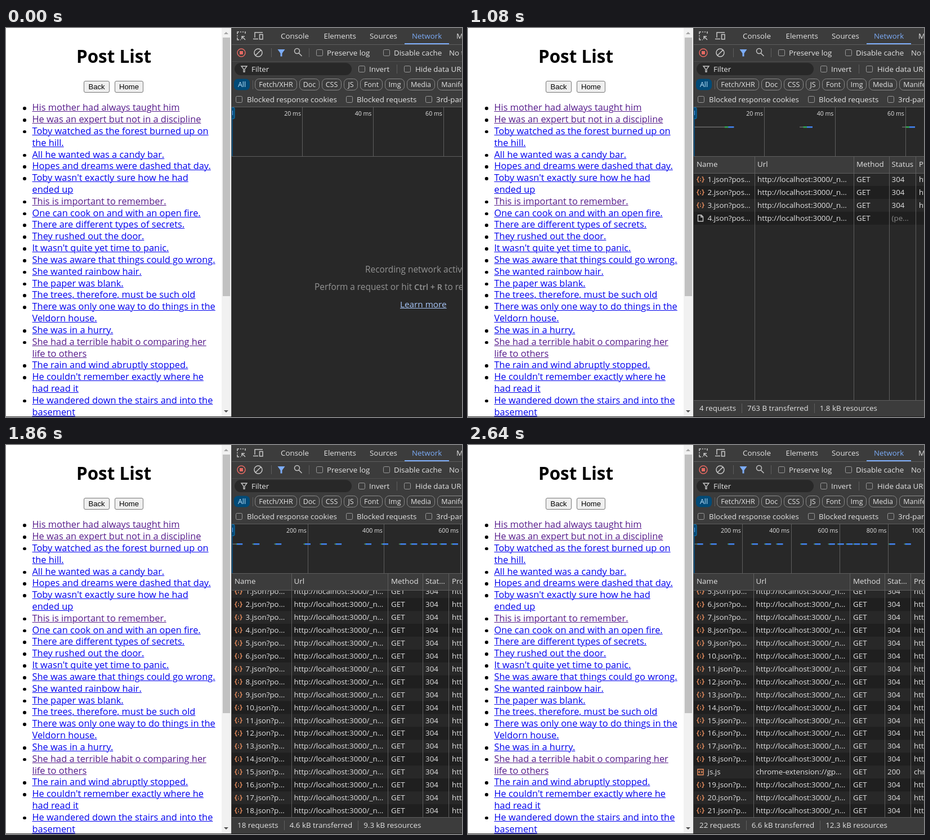
These frames come from a looping animation (810x692 px, 3300 ms). An HTML page with a canvas:

```html
<!DOCTYPE html>
<html lang="en">
<head>
<meta charset="utf-8">
<title>Post List</title>
<style>
html, body { margin: 0; width: 100%; height: 100%; overflow: hidden; background: #fff; }
body { position: relative; font: 16.4px/20.83px "Open Sans", "Noto Sans", sans-serif; color: #000; }
h1, ul, canvas, .button, .scrollbar, .scrollbar i, .edge { position: absolute; margin: 0; box-sizing: border-box; }
h1 { left: 0; top: 30px; width: 383px; font-size: 31.4px; line-height: 40px; text-align: center; }
ul { left: 46.5px; top: 131.2px; padding: 0; list-style: none; white-space: nowrap; }
li { position: relative; }
li::before { content: ""; position: absolute; left: -16.4px; top: 9px; width: 5.6px; height: 5.6px; border-radius: 50%; background: #000; }
li span { color: #00e; text-decoration: underline; text-decoration-thickness: 1px; }
li .visited { color: #551a8b; }
.button { top: 94px; height: 21px; border: 1px solid #767676; border-radius: 3px; background: #efefef;
  font: 13.1px/19px "Liberation Sans", Arial, sans-serif; text-align: center; }
.button.hover { background: #e0e0e0; border-color: #4f4f4f; }
.scrollbar { left: 383px; top: 0; width: 17px; height: 691px; background: #f1f1f1; }
.scrollbar i { left: 2px; top: 17px; width: 13px; height: 460px; background: #c1c1c1; }
.scrollbar .up, .scrollbar .down { left: 4px; width: 0; height: 0; background: none; border: 4px solid transparent; }
.scrollbar .up { top: 3px; border-bottom-color: #a3a3a3; }
.scrollbar .down { top: 680px; border-top-color: #505050; }
.edge { left: 0; top: 691px; width: 400px; height: 1px; background: #333; }
canvas { left: 400px; top: 0; }
</style>
</head>
<body>
<h1>Post List</h1>
<div class="button" style="left:138px;width:46px">Back</div>
<div class="button" id="home" style="left:193px;width:51px">Home</div>
<ul></ul>
<div class="scrollbar"><i></i><i class="up"></i><i class="down"></i></div>
<div class="edge"></div>
<canvas width="410" height="692"></canvas>
<script>
// A leading * marks a visited link, | a line break.
const posts = `*His mother had always taught him
*He was an expert but not in a discipline
Toby watched as the forest burned up on|the hill.
All he wanted was a candy bar.
Hopes and dreams were dashed that day.
Toby wasn't exactly sure how he had|ended up
*This is important to remember.
One can cook on and with an open fire.
There are different types of secrets.
They rushed out the door.
It wasn't quite yet time to panic.
She was aware that things could go wrong.
She wanted rainbow hair.
The paper was blank.
The trees, therefore, must be such old
There was only one way to do things in the|Veldorn house.
She was in a hurry.
*She had a terrible habit o comparing her|life to others
The rain and wind abruptly stopped.
He couldn't remember exactly where he|had read it
He wandered down the stairs and into the|basement`.split("\n");

document.querySelector("ul").innerHTML = posts.map(post =>
  `<li><span class="${post[0] === "*" ? "visited" : ""}">${post.replace("*", "").replace("|", "<br>")}</span></li>`).join("");

const home = document.getElementById("home");
const ctx = document.querySelector("canvas").getContext("2d");
ctx.translate(-400, 0);

const LOOP = 3300, STEP = 60;
const LEFT = 401, RIGHT = 810, TABLE_TOP = 259, TABLE_BOTTOM = 662, ROW = 22.93;
const BAR = "#3c3c3c", BODY = "#282828", LINE = "#5e5e5e", TEXT = "#e3e3e3", ICON = "#c7c7c7", BLUE = "#7cacf8", ORANGE = "#ee9160";

// When each row enters the table (loop time), and where its bar lies on the overview (ms).
const starts = [900, 960, 1020, 1080, 1140, 1200, 1320, 1380, 1440, 1470, 1500,
  1530, 1560, 1560, 1560, 1680, 1740, 1800, 1920, 1980, 2040, 2100];
const bars = [24, 80, 153, 250, 304, 353, 452, 508, 567, 604, 640, 670, 702, 740, 815, 880];
const SCRIPT_ROW = 18;

// Visible span in ms of the overview grid and of its bars, by loop time.
const gridSpan = [[1080, 65.2], [1620, 485], [1860, 605], [2160, 948]];
const barSpan = [[900, 65], [1080, 164], [1620, 485], [1860, 765], [2160, 948]];

function lerpPoints(points, t) {
  const next = points.findIndex(p => p[0] >= t);
  if (next === 0) return points[0][1];
  if (next < 0) return points[points.length - 1][1];
  const [t0, a] = points[next - 1], [t1, b] = points[next];
  return a + (b - a) * (t - t0) / (t1 - t0);
}

function rect(x, y, w, h, color) {
  ctx.fillStyle = color;
  ctx.fillRect(x, y, w, h);
}

function text(string, x, y, { color = TEXT, size = 13.35, weight = 400, align = "left" } = {}) {
  ctx.font = `${weight} ${size}px "Open Sans", "Noto Sans", sans-serif`;
  ctx.fillStyle = color;
  ctx.textAlign = align;
  ctx.fillText(string, x, y);
  return ctx.measureText(string).width;
}

function box(x, y, w, h, radius, { stroke, fill }) {
  ctx.beginPath();
  ctx.roundRect(x, y, w, h, radius);
  if (fill) { ctx.fillStyle = fill; ctx.fill(); }
  if (stroke) { ctx.strokeStyle = stroke; ctx.lineWidth = 1; ctx.stroke(); }
}

function icon(x, y, path, color, { width = 1.5, fill = false } = {}) {
  ctx.save();
  ctx.translate(x, y);
  ctx.strokeStyle = ctx.fillStyle = color;
  ctx.lineWidth = width;
  fill ? ctx.fill(new Path2D(path)) : ctx.stroke(new Path2D(path));
  ctx.restore();
}

const shapes = {
  inspect: "M-7-3V-7H-4M-2-7H0M2-7H4M6-7H7V-4M-7-1V1M-7 3V7H-4M-2 7H-1M7 7L1 1M1 6V1H6",
  device: "M-6 3V-6H8M-9 5.5H0M2.5-2.5H8V6H2.5Z",
  ring: "M7 0A7 7 0 1 1-7 0A7 7 0 1 1 7 0",
  slash: "M-5 5L5-5",
  funnel: "M-5-5H5L1 0V5H-1V0Z",
  search: "M3-2A4.5 4.5 0 1 1-6-2A4.5 4.5 0 1 1 3-2M2 2L7 7",
  json: "M-2.5-4.5H-3.5Q-4.5-4.5-4.5-3.5V-1.5L-6 0L-4.5 1.5V3.5Q-4.5 4.5-3.5 4.5H-2.5M2.5-4.5H3.5Q4.5-4.5 4.5-3.5V-1.5L6 0L4.5 1.5V3.5Q4.5 4.5 3.5 4.5H2.5M0-2.5V-1M0 .5V3",
  script: "M-5-5H5V5H-5ZM-1-2L-3 0L-1 2M1-2L3 0L1 2",
  file: "M-4.5-5.5H1.5L4.5-2.5V5.5H-4.5ZM1-5V-2H4.5"
};

function checkbox(x, y, label, labelX) {
  box(x + .5, y - 5.5, 11, 11, 2, { stroke: "#9a9a9a" });
  text(label, labelX, y + 5);
}

function divider(x, y, h) {
  rect(x, y, 1, h, LINE);
}

function drawToolbars() {
  rect(400, 0, 410, 140, BAR);
  rect(400, 29, 410, 1, LINE);
  rect(400, 59, 410, 1, "#4d4d4d");

  icon(418, 14, shapes.inspect, ICON);
  icon(448, 14, shapes.device, ICON);
  [["Console", 488], ["Elements", 564.5], ["Sources", 646], ["Memory", 800]].forEach(([tab, x]) => text(tab, x, 19));
  text("Network", 721, 19, { color: BLUE });
  rect(708, 27, 79, 2, BLUE);

  icon(418, 44, shapes.ring, "#e46962");
  rect(415, 41, 6, 6, "#e46962");
  icon(448, 44, shapes.ring + shapes.slash, ICON);
  divider(471, 36, 16);
  icon(489, 44, "M-6.5-6H6.5L1.5 1V6.5H-1.5V1Z", BLUE, { fill: true });
  icon(518.5, 43, shapes.search, ICON);
  divider(538, 36, 16);
  checkbox(551, 44, "Preserve log", 570);
  checkbox(670, 44, "Disable cache", 689);
  text("No throttling", 787, 49);

  box(406, 62, 208, 22, 11, { fill: BODY });
  icon(423, 73, shapes.funnel, ICON, { width: 1.3 });
  text("Filter", 436, 78);
  checkbox(626, 73, "Invert", 645);
  divider(694, 65, 16);
  checkbox(707, 73, "Hide data URLs", 727);

  box(405, 90.5, 28, 20, 7, { fill: "#004a77" });
  text("All", 419, 105, { color: "#c2e7ff", size: 12.5, align: "center" });
  divider(438, 93, 16);
  [["Fetch/XHR", 443, 73], ["Doc", 522, 34], ["CSS", 562, 33], ["JS", 601, 23], ["Font", 630, 38],
    ["Img", 674, 33], ["Media", 713, 48], ["Manifest", 767, 63]].forEach(([label, x, w]) => {
    box(x - .5, 90.5, w + 1, 20, 7, { stroke: "#8a8a8a" });
    text(label, x + w / 2, 105, { size: 12.5, align: "center" });
  });

  checkbox(408, 127, "Blocked response cookies", 428);
  checkbox(604, 127, "Blocked requests", 623);
  checkbox(745, 127, "3rd-party requests", 764);
}

function drawOverview(t, done) {
  rect(400, 140, 410, 1, LINE);
  const gridScale = (RIGHT - LEFT) / lerpPoints(gridSpan, t);
  const step = [10, 20, 50, 100, 200].find(ms => ms * gridScale >= 70);
  for (let ms = step; (ms - step) * gridScale < RIGHT - LEFT; ms += step) {
    const x = LEFT + ms * gridScale;
    rect(Math.round(x), 141, 1, 87, LINE);
    text(ms + " ms", x - 2.5, 156, { size: 10.6, weight: 500, align: "right" });
  }

  const scale = (RIGHT - LEFT) / lerpPoints(barSpan, t);
  bars.slice(0, done).forEach((ms, i) => {
    const length = 10 + 5.2 * scale, end = LEFT + ms * scale + length / 2, phase = 2.6 * scale;
    const start = i ? end - length : LEFT;
    rect(start, 175.5, end - start, 1.5, "#6b6b6b");
    rect(end - 10 - phase, 175, phase, 2.5, "#34a853");
    rect(end - 10, 175, 10, 2.5, "#4285f4");
  });

  rect(401, 141, 1.5, 87, "#0d5c94");
  box(400.5, 141.5, 5.5, 20, 2, { fill: "#004a77", stroke: "#1477b5" });
  rect(402, 147, 1, 8, BLUE);
  rect(400, 228, 410, 1, LINE);
}

function drawEmptyState() {
  const style = { color: "#949494", size: 15.4 };
  text("Recording network activity…", 638, 435, style);
  let x = 548;
  x += text("Perform a request or hit ", x, 466, style);
  x += text("Ctrl + R", x, 466, { ...style, weight: 600, size: 14.4 });
  text(" to record the reload.", x, 466, style);
  const width = text("Learn more", 700, 497, { color: "#a8c7fa", size: 15.3 });
  rect(700, 498, width, 1, "#a8c7fa");
}

function drawRow(i, y, columns, narrow, pending) {
  const script = i === SCRIPT_ROW, base = y + 16;
  const name = script ? "js.js" : `${i < SCRIPT_ROW ? i + 1 : i}.json?post`;
  const limit = narrow ? 9 : 10;
  const kind = pending ? "file" : script ? "script" : "json";
  if (i % 2) rect(400, y, 410, ROW, "#1f1f1f");
  icon(413, y + 11.5, shapes[kind], pending ? ICON : ORANGE, { width: 1.4 });
  text(name.length > limit ? name.slice(0, limit) + "..." : name, 425.5, base);
  text(script ? "chrome-extension://gp..." : "http://localhost:3000/_n...", columns[1], base);
  text("GET", columns[2], base);
  text(pending ? "(pe..." : script ? "200" : "304", columns[3], base, { color: pending ? "#8a8a8a" : TEXT });
  if (!pending) text(script ? "chrome-extension" : "http/1.1", columns[4], base);
}

function formatBytes(bytes) {
  return bytes < 1000 ? Math.round(bytes) + " B" : (bytes / 1000).toFixed(1) + " kB";
}

function drawTable(count, done) {
  const scroll = Math.max(0, count * ROW - (TABLE_BOTTOM - TABLE_TOP) - 1);
  const narrow = scroll > 0;
  const columns = narrow ? [406, 511.5, 684, 745, 792] : [406, 514, 690, 752.5, 801];
  const lines = narrow ? [507, 678, 740, 786] : [509, 685, 748, 795];

  ctx.save();
  ctx.beginPath();
  ctx.rect(400, TABLE_TOP, 410, TABLE_BOTTOM - TABLE_TOP);
  ctx.clip();
  for (let i = 0; i < count; i++) drawRow(i, TABLE_TOP - 1 + i * ROW - scroll, columns, narrow, i >= done);
  ctx.restore();

  rect(400, 229, 410, 29, BAR);
  rect(400, 258, 410, 1, LINE);
  ["Name", "Url", "Method", narrow ? "Stat..." : "Status", "Protocol"].forEach((label, i) => text(label, columns[i], 247));
  lines.forEach(x => divider(x, 229, TABLE_BOTTOM - 229));

  rect(400, TABLE_BOTTOM, 410, 30, BAR);
  rect(400, TABLE_BOTTOM, 410, 1, LINE);
  const script = done > SCRIPT_ROW ? 1 : 0, json = done - script;
  const transferred = json * 254.4 + script * 1250;
  const resources = json && 240 + json * (535 - 1.7 * json) + script * 1550;
  let x = 411;
  [`${count} requests`, `${formatBytes(transferred)} transferred`, `${formatBytes(resources)} resources`].forEach((label, i) => {
    if (i) divider(Math.round(x - 10), 668, 17);
    x += text(label, x, 681) + 20;
  });
}

function draw(now) {
  const t = Math.floor(now % LOOP / STEP) * STEP;
  const countAt = time => starts.filter(start => start <= time).length;
  const count = countAt(t), done = countAt(t - STEP);

  home.classList.toggle("hover", t >= 780 && t < 840);
  rect(400, 0, 410, 692, BODY);
  drawToolbars();
  drawOverview(t, done);
  if (count) drawTable(count, done);
  else drawEmptyState();
  rect(400, 0, 1, 692, "#4a4a4a");
  rect(400, 691, 410, 1, "#1f1f1f");
  requestAnimationFrame(draw);
}
requestAnimationFrame(draw);
</script>
</body>
</html>
```
